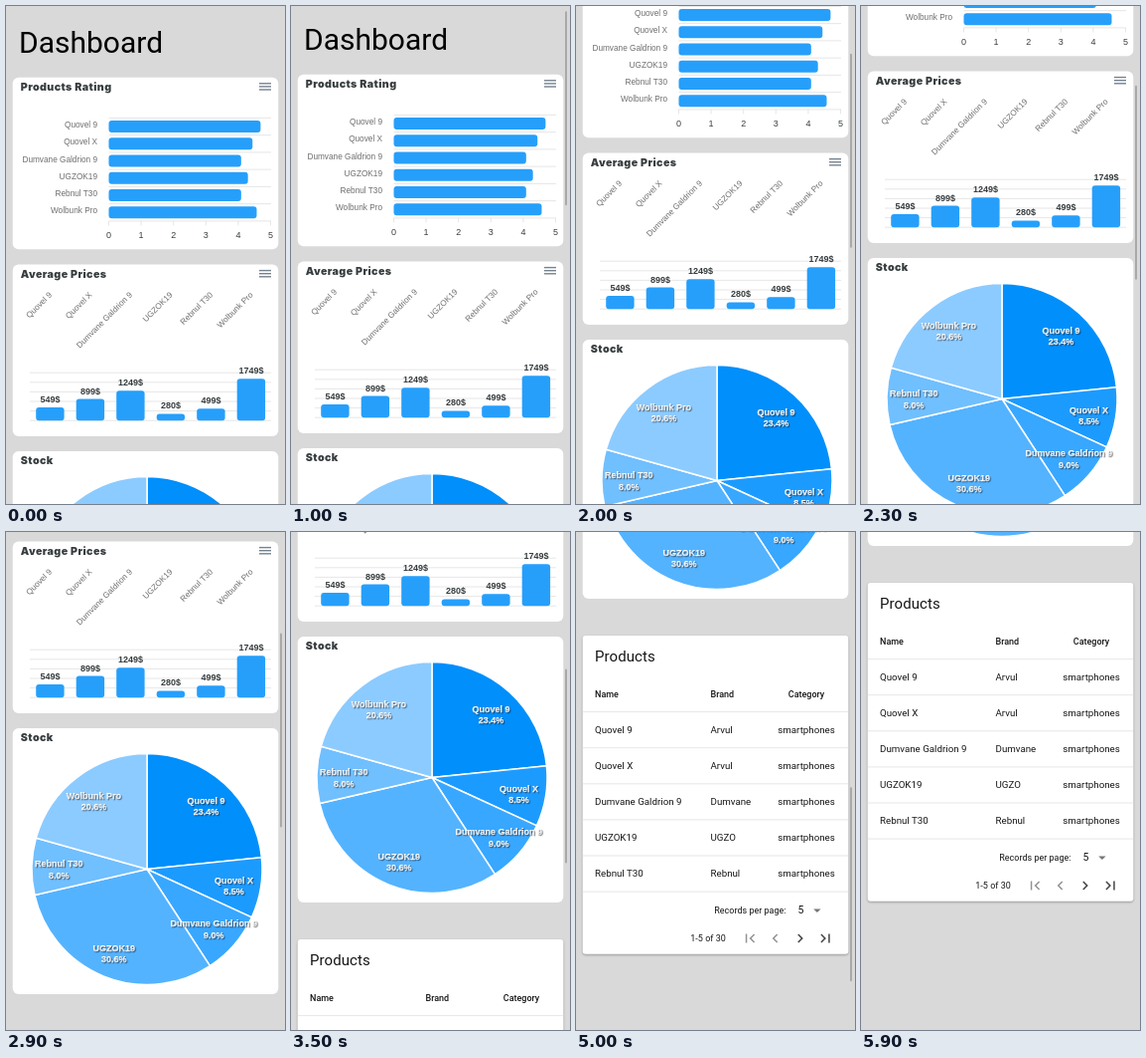
Write an HTML page that moves like this. It is 281x500 px and loops after 6.6 s.

```html
<!DOCTYPE html>
<html lang="en">
<head>
<meta charset="utf-8">
<title>Dashboard</title>
<style>
  html, body { margin: 0; width: 100%; height: 100%; overflow: hidden; background: #d9d9d9; }
  svg { display: block; width: 100vw; height: 100vh; }
  text { font-family: "Liberation Sans", Arial, sans-serif; fill: #373d3f; }
  .roboto { font-family: Roboto, sans-serif; fill: #000; }
  .heading { font: 900 10.7px Inter, sans-serif; letter-spacing: .4px; }
  .category { font-size: 8.24px; fill: #6e6e6e; }
  .tick { font-size: 9px; }
  .value { font-size: 9px; font-weight: bold; }
  .slice-label {
    font-size: 9px; font-weight: bold; fill: #fff; stroke: #fff; stroke-width: .25px;
    text-shadow: 1px 1px 1px rgba(0, 0, 0, .45);
  }
  .cell { font-size: 9.74px; }
  .head { font-size: 9px; font-weight: 500; }
  .small { font-size: 9px; }
  .table { fill: #161616; }
  .products { filter: drop-shadow(0 1px 1.1px rgba(0, 0, 0, .3)); }
</style>
</head>
<body>
<svg viewBox="0 0 281 500">
  <g id="page"></g>
  <rect id="thumb" x="276" width="2" height="195" rx="1" fill="#a9a9a9"/>
</svg>
<script>
const NS = "http://www.w3.org/2000/svg";
const page = document.getElementById("page");
const thumb = document.getElementById("thumb");

const items = [
  { name: "Quovel 9", brand: "Arvul", rating: 4.69, price: 549, stock: 94 },
  { name: "Quovel X", brand: "Arvul", rating: 4.44, price: 899, stock: 34 },
  { name: "Dumvane Galdrion 9", brand: "Dumvane", rating: 4.09, price: 1249, stock: 36 },
  { name: "UGZOK19", brand: "UGZO", rating: 4.3, price: 280, stock: 123 },
  { name: "Rebnul T30", brand: "Rebnul", rating: 4.09, price: 499, stock: 32 },
  { name: "Wolbunk Pro", brand: "Wolbunk", rating: 4.57, price: 1749, stock: 83 },
];

function add(tag, attrs, content) {
  const node = document.createElementNS(NS, tag);
  for (const key in attrs) node.setAttribute(key, attrs[key]);
  if (content !== undefined) node.textContent = content;
  return page.appendChild(node);
}

const text = (x, y, content, cls, anchor = "start", extra = {}) =>
  add("text", { x, y, class: cls, "text-anchor": anchor, ...extra }, content);

const line = (x1, y1, x2, y2, stroke = "#e0e0e0", width = 0.8) =>
  add("line", { x1, y1, x2, y2, stroke, "stroke-width": width });

const bar = (x, y, width, height) =>
  add("rect", { x, y, width, height, rx: 3, fill: "#269ffb" });

function card(y, height, title, hasMenu) {
  add("rect", { x: 6.7, y, width: 267.6, height, rx: 6, fill: "#fff" });
  text(14.8, y + 13, title, "heading");
  if (!hasMenu) return;
  for (let i = 0; i < 3; i++) line(255, y + 6 + i * 3.1, 267, y + 6 + i * 3.1, "#75828f", 1.4);
}

function drawRatings() {
  const left = 103.5, unit = 32.6, top = 112.4, step = 17.25, bottom = top + step * 6;
  card(71.8, 172.5, "Products Rating", true);
  for (let i = 0; i <= 6; i++) line(left, top + i * step, 267, top + i * step);
  for (let i = 0; i <= 5; i++) {
    line(left + i * unit, bottom, left + i * unit, bottom + 4.5);
    text(left + i * unit, 233, i, "tick", "middle");
  }
  items.forEach((item, i) => {
    bar(left, top + i * step + 2.6, item.rating * unit, 12.1);
    text(92, 122.2 + i * step, item.name, "category", "end");
  });
}

function drawPrices() {
  const base = 416.2, step = 40.5;
  card(259.6, 172.5, "Average Prices", true);
  for (let i = 0; i <= 5; i++) line(24, base - i * 9.6, 267, base - i * 9.6);
  items.forEach((item, i) => {
    const center = 44.4 + i * step;
    const height = item.price * 0.024;
    bar(center - 14.2, base - height, 28.4, height);
    text(center, base - height - 5, item.price + "$", "value", "middle");
    text(0, 0, item.name, "category", "end",
      { transform: `translate(${center + 2.3} 290.5) rotate(-45)` });
  });
}

function drawStock() {
  const cx = 142, cy = 588.5, radius = 116, labelRadius = 88.7;
  const total = items.reduce((sum, item) => sum + item.stock, 0);
  const point = (share, r) => [
    cx + r * Math.sin(share * 2 * Math.PI),
    cy - r * Math.cos(share * 2 * Math.PI),
  ];
  card(447, 267, "Stock", false);
  let start = 0;
  const labels = [];
  items.forEach((item, i) => {
    const share = item.stock / total;
    add("path", {
      d: `M${cx} ${cy}L${point(start, radius)}A${radius} ${radius} 0 0 1 ${point(start + share, radius)}Z`,
      fill: `rgb(${28 * i}, ${143 + 12 * i}, ${i ? 255 : 251})`,
      stroke: "#fff", "stroke-width": 1.5,
    });
    labels.push([item.name, share, point(start + share / 2, labelRadius)]);
    start += share;
  });
  for (const [name, share, [x, y]] of labels) {
    text(x, y, name, "slice-label", "middle");
    text(x, y + 11.2, (share * 100).toFixed(1) + "%", "slice-label", "middle");
  }
}

function icon(x, y, d, fill, flip = 1) {
  add("path", { d, fill, transform: `translate(${x} ${y}) scale(${0.749 * flip} .749) translate(-12 -12)` });
}

function drawTable() {
  const top = 751, brandX = 135.5, categoryX = 232;
  const chevron = "M15.41 7.41L14 6l-6 6 6 6 1.41-1.41L10.83 12z";
  const edge = "M18.41 16.59L13.82 12l4.59-4.59L17 6l-6 6 6 6zM6 6h2v12H6z";
  add("rect", { x: 6.7, y: top, width: 267.6, height: 319.7, rx: 3, fill: "#fff", class: "products" });
  text(19, 777, "Products", "roboto table", "start", { "font-size": 15, "letter-spacing": 0.08 });
  text(19, 813, "Name", "roboto table head");
  text(brandX, 813, "Brand", "roboto table head");
  text(categoryX, 813, "Category", "roboto table head", "middle");
  line(6.7, 827.6, 274.3, 827.6);
  items.slice(0, 5).forEach((item, i) => {
    const y = 849 + i * 36.1;
    text(19, y, item.name, "roboto table cell");
    text(brandX, y, item.brand, "roboto table cell");
    text(categoryX, y, "smartphones", "roboto table cell", "middle");
    line(6.7, 863.7 + i * 36.1, 274.3, 863.7 + i * 36.1);
  });
  text(139.3, 1030, "Records per page:", "roboto table small");
  text(223.5, 1030, "5", "roboto table", "start", { "font-size": 10.5 });
  add("path", { d: "M239.2 1025.4h7.4l-3.7 3.7z", fill: "#757575" });
  text(115.3, 1058, "1-5 of 30", "roboto table small");
  icon(175.3, 1055, edge, "#929292");
  icon(200.7, 1055, chevron, "#929292");
  icon(225.8, 1055, chevron, "#444", -1);
  icon(251.2, 1055, edge, "#444", -1);
}

text(13, 47, "Dashboard", "roboto", "start", { "font-size": 30 });
drawRatings();
drawPrices();
drawStock();
drawTable();

const LOOP = 6600, TICK = 100;
// Each scroll advances once per tick; lead is the progress already made on its first tick.
const scrolls = [
  { start: 1000, ticks: 6, from: 0, to: 100, lead: 0.103 },
  { start: 2000, ticks: 7, from: 100, to: 250, lead: 0.173 },
  { start: 3100, ticks: 12, from: 250, to: 500, lead: 0.073 },
  { start: 4500, ticks: 9, from: 500, to: 700, lead: 0.1 },
];
const smooth = u => u * u * (3 - 2 * u);

function scrollAt(time) {
  const current = scrolls.filter(s => time >= s.start).pop();
  if (!current) return 0;
  const { start, ticks, from, to, lead } = current;
  const tick = Math.min(Math.floor((time - start) / TICK), ticks - 1);
  return Math.round(from + (to - from) * smooth(lead + (1 - lead) * tick / (ticks - 1)));
}

function thumbOpacity(time) {
  if (time < 1000 || time >= 5900) return 0;
  return time < 5700 ? 1 : 0.5;
}

function render(time) {
  const scroll = scrollAt(time);
  page.setAttribute("transform", `translate(0 ${-scroll})`);
  thumb.setAttribute("y", 4 + scroll * 0.39);
  thumb.setAttribute("opacity", thumbOpacity(time));
}

const began = performance.now();
function frame() {
  render((performance.now() - began) % LOOP);
  requestAnimationFrame(frame);
}
frame();
</script>
</body>
</html>
```
